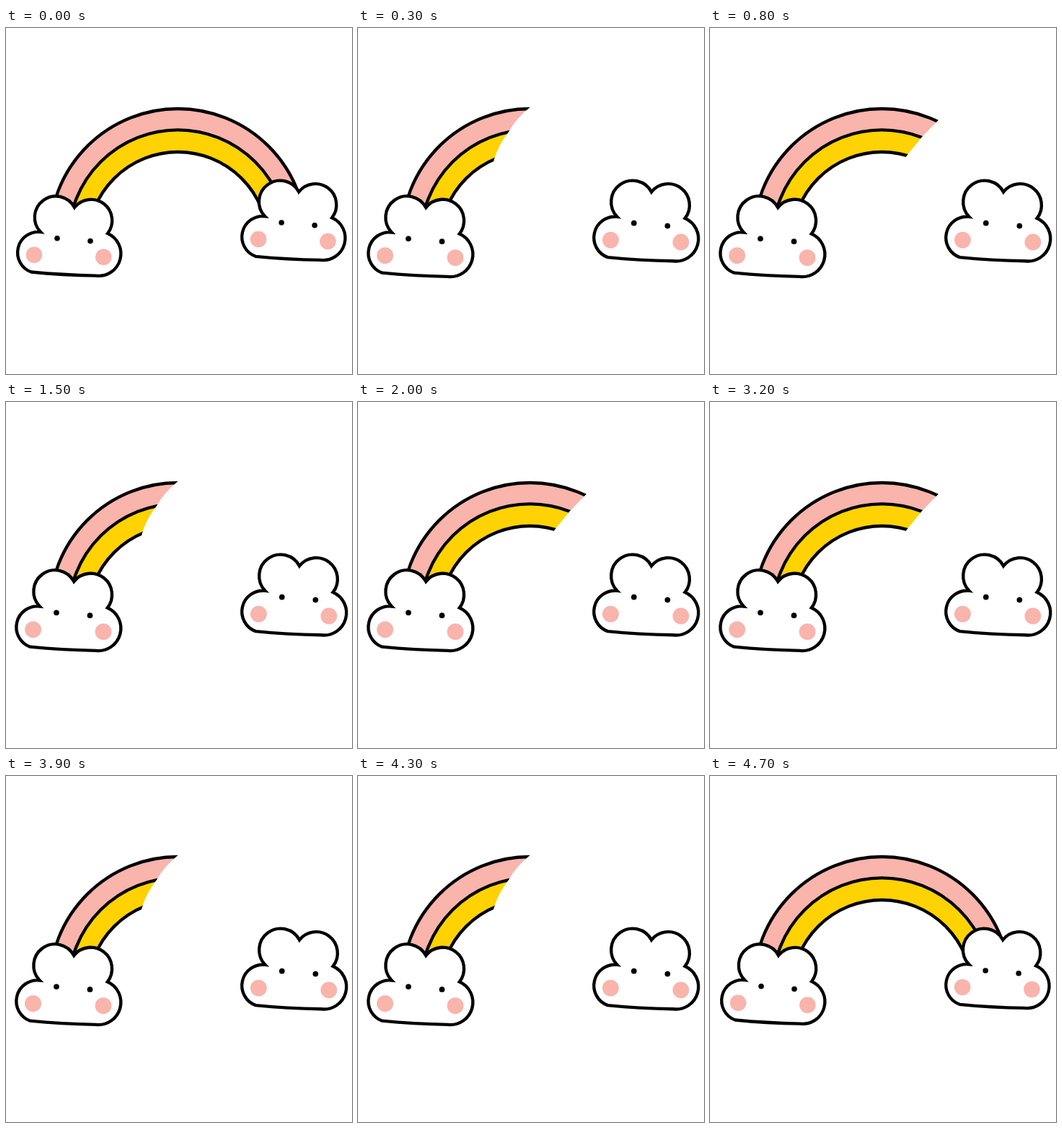
Recreate the animation shown at these times as an HTML page with a canvas. Size 480 by 480 pixels, loop 4800 ms.

```html
<!DOCTYPE html>
<html lang="en">
<head>
<meta charset="utf-8">
<title>Rainbow clouds</title>
<style>
html, body { margin: 0; width: 100%; height: 100%; overflow: hidden; background: #fff; }
canvas { display: block; }
</style>
</head>
<body>
<canvas id="stage" width="480" height="480"></canvas>
<script>
const ctx = document.getElementById('stage').getContext('2d');
const PINK = '#f9b4ac', YELLOW = '#ffd203';
const STEP = 100, STEPS = 12, CX = 238.5;

// Rainbow arcs from outside in: centre y, radius
const ARCS = [[290, 178], [293, 151.7], [297, 125]];

// Wipe stages: outer angle in degrees, lag of the inner edge, bow of the edge
const CUTS = [null, [48, 4, 0], [25.5, 9, 0], [0, 25, 0.6], [-31, 20, 0.4], [-85, 0, 0]];

const CLOUD = new Path2D('M48 283A29.3 29.3 0 1 1 95 249A29.2 29.2 0 0 1 141 285' +
  'A30.7 30.7 0 0 1 125 343.6Q78 342.7 35 338.5A28.7 28.7 0 0 1 48 283Z');

function dot(x, y, r, color) {
  ctx.fillStyle = color;
  ctx.beginPath();
  ctx.arc(x, y, r, 0, 7);
  ctx.fill();
}

function cloud(dx, dy, px, py, scale) {
  ctx.save();
  ctx.translate(px, py);
  ctx.scale(scale, scale);
  ctx.translate(dx - px, dy - py);
  ctx.fillStyle = '#fff';
  ctx.fill(CLOUD);
  ctx.stroke(CLOUD);
  dot(39, 314.8, 11.3, PINK);
  dot(135.3, 317.7, 11.3, PINK);
  dot(71, 291.7, 3.8, '#000');
  dot(117, 295.5, 3.8, '#000');
  ctx.restore();
}

function polar(deg, r) {
  const a = deg * Math.PI / 180;
  return [CX + r * Math.sin(a), 292 - r * Math.cos(a)];
}

function clipWipe([angle, lag, bow]) {
  const edge = [polar(angle, 182), polar(angle - lag * 0.45, 151), polar(angle - lag, 119)];
  const [tip] = edge;
  ctx.beginPath();
  ctx.moveTo(0, 292);
  ctx.lineTo(0, 0);
  ctx.lineTo(tip[0], 0);
  ctx.lineTo(...tip);
  for (let i = 1; i < 3; i++) {
    const [x0, y0] = edge[i - 1], [x1, y1] = edge[i];
    ctx.quadraticCurveTo((x0 + x1) / 2 - 7 * bow, (y0 + y1) / 2 - 3 * bow, x1, y1);
  }
  ctx.lineTo(CX, 292);
  ctx.clip();
}

function circle([y, r]) {
  const path = new Path2D();
  path.arc(CX, y, r, 0, 2 * Math.PI);
  return path;
}

function band(outer, inner, color) {
  const path = circle(outer);
  path.addPath(circle(inner));
  ctx.fillStyle = color;
  ctx.fill(path, 'evenodd');
}

function rainbow(cut) {
  ctx.save();
  ctx.beginPath();
  ctx.rect(0, 0, 480, 250);
  ctx.clip();
  if (cut) clipWipe(cut);
  band(ARCS[0], ARCS[1], PINK);
  band(ARCS[1], ARCS[2], YELLOW);
  for (const arc of ARCS) ctx.stroke(circle(arc));
  ctx.restore();
}

function draw(now) {
  const step = Math.floor(now / STEP) % STEPS;
  const resting = step === 0 || step === STEPS - 1;
  const scale = resting ? 1 : 1.012;
  ctx.clearRect(0, 0, 480, 480);
  ctx.lineWidth = 4.3;
  rainbow(resting ? null : CUTS[5 - Math.abs(5 - step)]);
  cloud(0, 0, 160, 240, scale);
  cloud(311.2, -21.7, 330, 210, scale);
}

const start = performance.now();
function tick() {
  draw(performance.now() - start);
  requestAnimationFrame(tick);
}
tick();
</script>
</body>
</html>
```
